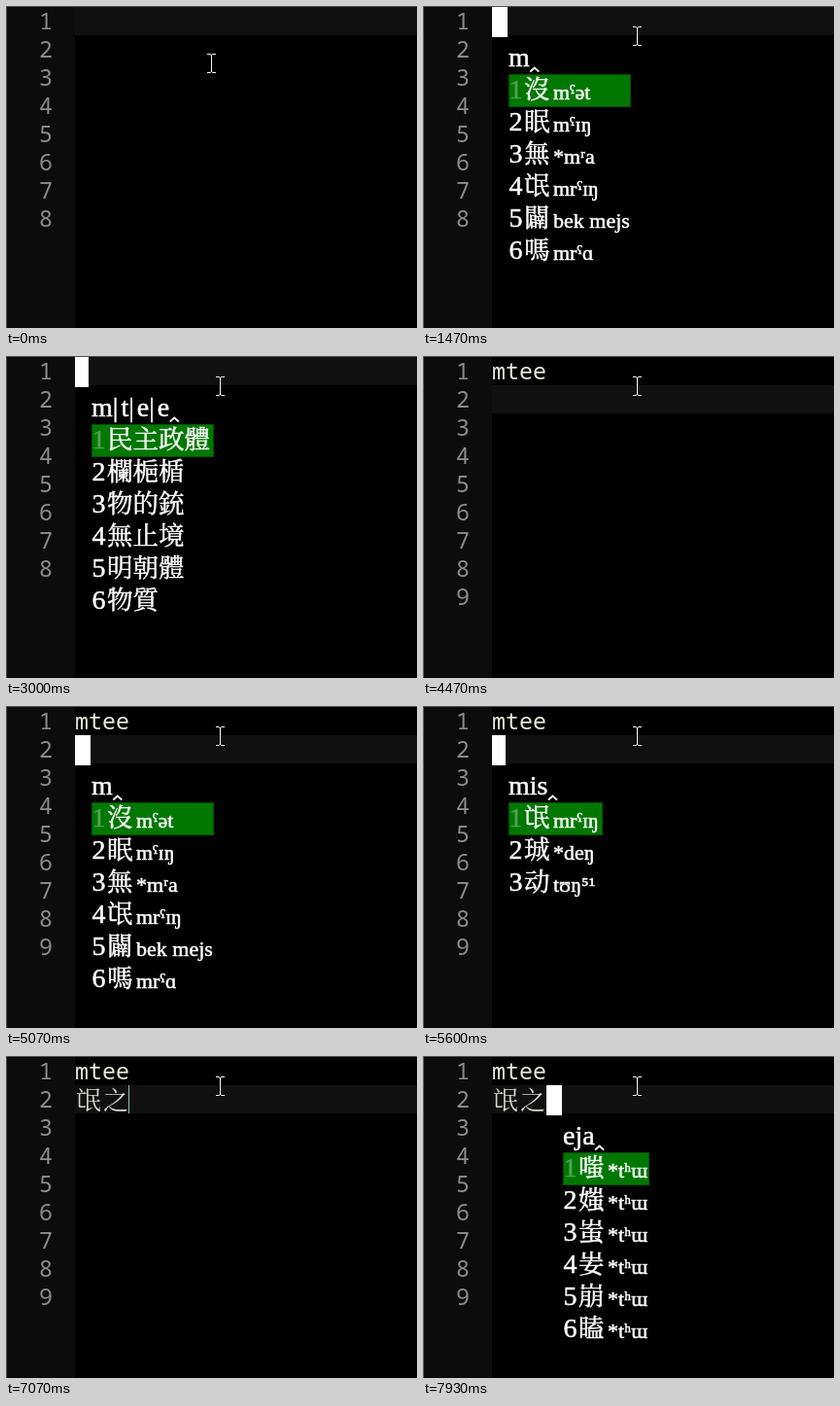
An HTML page for the animation above (8 s loop, 423 by 331 pixels).

```html
<!DOCTYPE html>
<html lang="zh-Hant">
<head>
<meta charset="utf-8">
<title>Input method</title>
<style>
  html, body { margin: 0; width: 100%; height: 100%; overflow: hidden; background: #000; }
  svg { display: block; width: 423px; height: 331px; }
  rect { shape-rendering: crispEdges; }
  text { white-space: pre; }
  .num, .code { font: 23.3px "Noto Sans Mono", "DejaVu Sans Mono", monospace; }
  .num { fill: #8c8c8c; text-anchor: end; }
  .code { fill: #ebe6d6; }
  .typed { font: 300 26px "Noto Serif CJK TC", "Noto Sans CJK TC", "Noto Sans CJK SC", serif; fill: #ddd8cb; }
  .popup { font-family: "Liberation Serif", "Noto Serif", "DejaVu Sans", serif; }
  .popup text { fill: #fff; stroke: #fff; stroke-width: 0.5; }
  .popup .chosen { fill: #50a050; stroke: #50a050; }
  .keys, .index { font-size: 28px; }
  .keys .bar { letter-spacing: 3px; }
  .han { font: 26.5px "Noto Serif CJK TC", "Noto Sans CJK TC", "Noto Sans CJK SC", "Noto Sans CJK JP", serif; }
  .gloss { font-size: 22px; }
</style>
</head>
<body>
<svg id="stage" viewBox="0 0 423 331"></svg>
<script>
const LOOP = 8000;
const LINE = 29;
const ROW = 33;
const HAN = 26.5;
const stage = document.getElementById("stage");

function add(parent, tag, attrs, content) {
  const node = document.createElementNS("http://www.w3.org/2000/svg", tag);
  for (const key in attrs) node.setAttribute(key, attrs[key]);
  if (content !== undefined) node.textContent = content;
  parent.appendChild(node);
  return node;
}
const box = (x, y, width, height, fill, parent = stage) =>
  add(parent, "rect", { x, y, width, height, fill });
const label = (parent, cls, x, y, content) => add(parent, "text", { class: cls, x, y }, content);
const show = (node, on) => node.setAttribute("visibility", on ? "visible" : "hidden");
const place = (node, x, y) => node.setAttribute("transform", `translate(${x} ${y})`);

// Editor
box(0, 0, 423, 331, "#000");
box(0, 0, 71, 331, "#0c0c0c");
const currentLine = box(71, 1, 352, LINE, "#101010");
box(0, 0, 423, 1, "#505050");
box(0, 0, 1, 331, "#505050");
let lastNumber;
for (let n = 1; n <= 9; n++) lastNumber = label(stage, "num", 48, 24 + (n - 1) * LINE, n);

const lineOne = label(stage, "code", 71, 24, "mtee");
const charOne = label(stage, "typed", 72, 54.5, "氓");
const charTwo = label(stage, "typed", 100, 54.5, "之");
const caret = box(0, 0, 1, LINE, "#8cc4ae");
const block = box(0, 0, 14, 31, "#fff");
const tail = box(14, 0, 2, 31, "#fff");

// Candidate popups: a space splits the characters from their reading
const rowsM = ["沒 mˤət", "眠 mˤɪŋ", "無 *mʳa", "氓 mrˤɪŋ", "闢 bek mejs", "嗎 mrˤɑ"];
const rowsT = ["之 *tə", "的 tek", "體 *rˤijʔ", "他 l̥ˤaj", "動 doŋ tsˤraŋ", "同 lˤoŋ"];
const sessions = [
  { x: 71, y: 1, end: 3330, steps: [
    [1470, "m", 126, rowsM],
    [1600, "m|t", 106, ["明天", "沒 mˤət", "民 mrˤats", "無他", "馬蹄", "門徒"]],
    [1930, "m|t|e", 99, ["民主制", "明天的", "馬蹄鐵", "無題", "名堂", "門徒"]],
    [2130, "m|t|e|e", 126, ["民主政體", "欄梔楯", "物的銃", "無止境", "明朝體", "物質"]]
  ] },
  { x: 71, y: 30, end: 5800, steps: [
    [5070, "m", 126, rowsM],
    [5200, "mi", 97, ["眠 mˤɪŋ", "氓 mrˤɪŋ", "民 *miŋ", "蜜 *mit", "名 meŋ", "面 mens"]],
    [5330, "mis", 97, ["氓 mrˤɪŋ", "珹 *deŋ", "动 tʊŋ⁵¹"]]
  ] },
  { x: 99, y: 30, end: 7070, steps: [
    [6530, "t", 156, rowsT],
    [6600, "ts", 134, ["子 *tsəʔ", "之 *tə", "從 dzoŋ", "祭 tsˤets", "作 tsˤak", "早 tsˤuʔ"]],
    [6670, "tsi", 134, ["之 *tə", "止 *təʔ", "志 təs tsrəʔ", "芝 *tə", "址 *təʔ", "沚 *təʔ"]]
  ] },
  { x: 127, y: 30, end: LOOP, steps: [
    [7800, "e", 105, ["兒 *ŋe", "一 *ʔit", "嗤 *tʰɯ", "爾 neʔ", "而 *nə", "耳 nəʔ"]],
    [7870, "ej", 105, ["嗤 *tʰɯ", "兒 *ŋe", "媸 *tʰɯ", "鷖 ʔˤij", "蚩 *tʰɯ", "翳 ʔˤijs"]],
    [7930, "eja", 89, ["嗤 *tʰɯ", "媸 *tʰɯ", "蚩 *tʰɯ", "妛 *tʰɯ", "崩 *tʰɯ", "瞌 *tʰɯ"]]
  ] }
];

function makePopup(x, y, keys, width, rows) {
  const popup = add(stage, "g", { class: "popup" });
  place(popup, x + 17, y);
  const line = label(popup, "keys", 0, 61);
  for (const part of keys.split(/(\|)/)) {
    add(line, "tspan", { class: part === "|" ? "bar" : "key" }, part);
  }
  const end = line.getComputedTextLength() + 0.5;
  add(popup, "path", {
    d: `M${end} 66.5l4.5-4 4.5 4`, fill: "none", stroke: "#fff", "stroke-width": 1.8
  });
  box(0, 69, width, 34, "#005000", popup);
  box(1, 70, width - 2, 32, "#007800", popup);
  rows.forEach((row, i) => {
    const base = 94 + i * ROW;
    const [han, ...gloss] = row.split(" ");
    label(popup, i ? "index" : "index chosen", 0.5, base, i + 1);
    label(popup, "han", 16, base, han);
    if (gloss.length) label(popup, "gloss", 19.5 + HAN * han.length, base + 1, gloss.join(" "));
  });
  return popup;
}

const popups = [];
for (const s of sessions) {
  s.start = s.steps[0][0];
  s.steps.forEach(([from, keys, width, rows], i) => {
    const to = i + 1 < s.steps.length ? s.steps[i + 1][0] : s.end;
    popups.push({ from, to, node: makePopup(s.x, s.y, keys, width, rows) });
  });
}

// Mouse pointer
const pointer = add(stage, "g", {});
const beam = "M-4 -9.5H-1L.5 -8.5 2 -9.5H5M-4 9.5H-1L.5 8.5 2 9.5H5M.5 -9V9";
add(pointer, "path", { d: beam, fill: "none", stroke: "#000", "stroke-width": 3 });
add(pointer, "path", { d: beam, fill: "none", stroke: "#fff", "stroke-width": 1 });

const moves = [[0, 0], [70, 0.2], [130, 0.5], [200, 0.8], [270, 1]];
const carets = [
  [400, 1000, 71, 1], [3330, 3870, 126, 1], [3870, 4470, 71, 30],
  [5870, 6470, 98, 30], [7070, 7600, 126, 30]
];
const tailOff = [[1930, 2470], [3000, 3330], [5600, 5800]];

function draw(t) {
  const within = ([from, to]) => t >= from && t < to;

  currentLine.setAttribute("y", t < 3870 ? 1 : 30);
  show(lastNumber, t >= 3870);
  show(lineOne, t >= 3330);
  show(charOne, t >= 5870);
  show(charTwo, t >= 7070);

  const thin = carets.find(within);
  show(caret, thin);
  if (thin) place(caret, thin[2], thin[3]);

  const session = sessions.find(s => within([s.start, s.end]));
  for (const part of [block, tail]) {
    show(part, session);
    if (session) place(part, session.x, session.y);
  }
  tail.setAttribute("fill", tailOff.some(within) ? "#000" : "#fff");
  for (const p of popups) show(p.node, within([p.from, p.to]));

  const k = moves.filter(m => t >= m[0]).pop()[1];
  place(pointer, Math.round(211 + 9 * k), Math.round(59 - 28 * k));
}

const began = performance.now();
function tick() {
  draw((performance.now() - began) % LOOP);
  requestAnimationFrame(tick);
}
draw(0);
requestAnimationFrame(tick);
</script>
</body>
</html>
```
